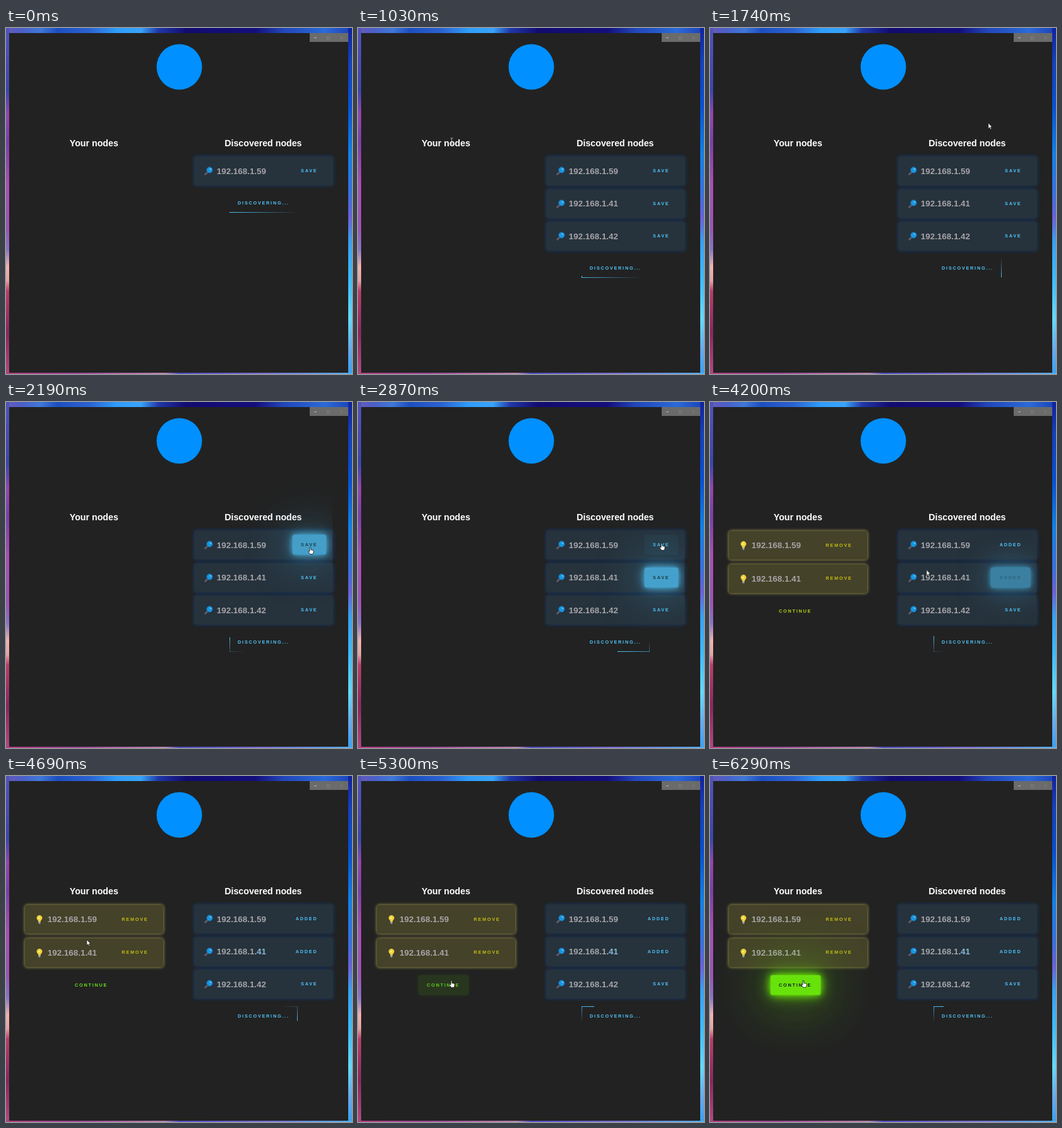
An HTML page that plays this animation: 548x547 px, repeating every 6330 ms.

```html
<!DOCTYPE html>
<html lang="en">
<head>
<meta charset="utf-8">
<title>Node discovery</title>
<style>
  html, body { margin: 0; width: 100%; height: 100%; overflow: hidden; background: #222; }
  #stage { position: absolute; left: 0; top: 0; width: 548px; height: 547px; overflow: hidden;
    font-family: "Liberation Sans", Arial, sans-serif; font-weight: bold; }
  #stage div, #stage svg { position: absolute; }
  .edge-top { inset: 0 0 auto 0; height: 8px; background: linear-gradient(100deg, #6a58b8, #4a60c8 5%,
    #3f78d8 10%, #1d4ec0 15%, #2a62d0 24%, #2f9cfa 32%, #38a4f8 39%, #2038a8 44%, #120c70 52%,
    #140e7c 72%, #2146b8 80%, #2a6ad8 92%, #1c40b8); }
  .edge-left { inset: 0 auto 0 0; width: 5px; background: linear-gradient(#4f56b8, #4a4cae 10%, #3a48a8 18%,
    #9448b0 25%, #7a40a8 33%, #a850b4 45%, #9a54b8 58%, #8a74c4 64%, #f0b4b0 69%, #e6a4a6 73%, #b83e6a 76%,
    #86295e 88%, #b04a80); }
  .edge-right { inset: 0 0 0 auto; width: 6px; background: linear-gradient(#10239a, #1440b8 9%, #0a50d0 22%,
    #1480e4 36%, #3a70dc 48%, #6a62d4 55%, #3aa0f0 62%, #40b8f6 72%, #68d8f6 84%, #6aa8e8 93%, #3aa0f0); }
  .edge-bottom { inset: auto 0 0 0; height: 2px; background: linear-gradient(90deg, #b04080, #a04898 20%,
    #b885ae 46%, #5050c0 50%, #7a70d0 75%, #50b0f0); }
  .window { left: 5px; top: 8px; width: 537px; height: 537px; background: #222; }
  .label { line-height: 0; white-space: nowrap; }
  .title { font-size: 14.2px; color: #fff; }
  .ip { font-size: 13.4px; color: #a5a3a6; }
  .card { border-radius: 4px; }
  .found { left: 298px; width: 220px; height: 46px; background: #26323c; box-shadow: 0 0 5px 1px #18355c; }
  .saved { left: 30px; width: 219px; height: 45px; background: #444229; box-shadow: 0 0 4.5px 1px #8a8345; }
  .layer { inset: 0; }
  #buttons { clip-path: inset(8px 31px 2px 5px); }
  .button { height: 31px; line-height: 31px; padding: 0 13.6px; border-radius: 2.5px; white-space: nowrap;
    font-size: 7.25px; letter-spacing: 1.77px; }
  #discover { left: 353.5px; overflow: hidden; border-radius: 0; color: #4fc3f7; }
</style>
</head>
<body>
<div id="stage">
  <div class="edge-top"></div><div class="edge-left"></div>
  <div class="edge-right"></div><div class="edge-bottom"></div>
  <div class="window"></div>
  <svg width="548" height="547">
    <circle cx="274.5" cy="61.5" r="36" fill="#0090ff"/>
    <rect x="481" y="8" width="61" height="14" fill="#6b6b6b"/>
    <path d="M488 15.5h4" stroke="#bbb" fill="none"/>
    <path d="M508.5 13.5h4v4h-4zM529.5 13.5l4 4m0-4l-4 4" stroke="#858585" stroke-width=".8" fill="none"/>
  </svg>
  <div class="layer" id="cards"></div>
  <div class="layer" id="buttons"></div>
  <svg id="pointer" width="548" height="547">
    <path data-kind="beam" d="M-2-5h1.500l.5.5.5-.5h1.500M0-4.500v9M-2 5h1.500l.5-.5.5.5h1.500" fill="none" stroke="#c8c8c8" stroke-width=".9"/>
    <path data-kind="arrow" d="M-2.500-4.500v9l2-1.900 1.400 3 1.500-.7-1.400-2.900h2.700z" fill="#fff" stroke="#111" stroke-width=".7"/>
    <path data-kind="hand" d="M-2-5.300q1.100-.9 1.900.2v3.600l3.200.6q1.200.3 1.100 1.600l-.5 2.700-.7 1.900h-4.400l-2.700-3.900q-.1-1.400 1.200-1l.9.8z" fill="#fff" stroke="#111" stroke-width=".8"/>
  </svg>
</div>
<script>
const LOOP = 6330, FADE = 500;
const ROW = 51.5, SAVED_ROW = 52.5;
const BLUE = [79, 195, 247], GREEN = [108, 236, 10], YELLOW = [196, 188, 17];
const INK = [16, 28, 34];
const byId = id => document.getElementById(id);

function add(parent, className, html, style) {
  const el = document.createElement('div');
  el.className = className;
  el.innerHTML = html;
  Object.assign(el.style, style);
  return parent.appendChild(el);
}

const px = n => n + 'px';
const at = (x, y) => ({ left: px(x), top: px(y) });
const rgba = (c, a = 1) => `rgba(${c.map(Math.round)},${a})`;
const mix = (a, b, k) => a.map((v, i) => v + (b[i] - v) * k);
const clamp = v => Math.min(1, Math.max(0, v));
const show = (el, on) => { el.style.display = on ? '' : 'none'; };

const lensIcon = `<svg width="16" height="16" viewBox="-8 -8 16 16">
  <path d="M-1.500 1.500L-5.500 5.500" stroke="#625b70" stroke-width="2.600" stroke-linecap="round"/>
  <circle cx="1.500" cy="-1.500" r="4.700" fill="#1c96e0" stroke="#17679f" stroke-width=".9"/>
  <circle cx="3" cy="-3" r="1.100" fill="#8fd8ff"/></svg>`;
const bulbIcon = `<svg width="14" height="16" viewBox="-7 -8 14 16">
  <path d="M-1.800 3.200Q-1.800 1.800-3.200.3A4.300 4.300 0 1 1 3.200.3Q1.800 1.800 1.800 3.200z" fill="#f0d23c"/>
  <circle cx="-.6" cy="-2.500" r="1.500" fill="#fbeb90"/>
  <path d="M-1.700 3.900h3.400M-1.400 5.600h2.800" stroke="#a9a9a4" stroke-width="1.600"/></svg>`;

const cards = byId('cards'), buttons = byId('buttons');
add(cards, 'label title', 'Your nodes', at(100.8, 181.8));
add(cards, 'label title', 'Discovered nodes', at(346.3, 181.8));

// Each switch is [time, hovered].
const found = [
  { ip: '192.168.1.59', from: 0, added: 3100,
    hover: [[1950, 1], [2320, 0], [2840, 1], [3420, 0]] },
  { ip: '192.168.1<span>.41</span>', from: 180, added: 3700,
    hover: [[2340, 1], [2795, 0], [3440, 1], [4070, 0]] },
  { ip: '192.168.1.42', from: 380, added: Infinity, hover: [] }
];
found.forEach((node, i) => {
  const y = i * ROW;
  node.group = add(cards, 'layer', '');
  add(node.group, 'card found', '', { top: px(203 + y) });
  add(node.group, '', lensIcon, at(313, 218 + y));
  node.text = add(node.group, 'label ip', node.ip, at(333.8, 226.8 + y));
  node.button = add(buttons, 'button', 'SAVE', { right: '41px', top: px(210 + y) });
});

const saved = found.slice(0, 2).map((node, i) => {
  const y = i * SAVED_ROW;
  const group = add(cards, 'layer', '');
  add(group, 'card saved', '', { top: px(204 + y) });
  add(group, '', bulbIcon, at(46, 219 + y));
  add(group, 'label ip', node.ip, at(65.8, 227.3 + y));
  add(group, 'button', 'REMOVE', { right: '309px', top: px(210.5 + y), color: rgba(YELLOW) });
  return { group, from: node.added };
});

const proceed = add(buttons, 'button', 'CONTINUE', { left: '95.5px' });
const discover = add(buttons, 'button', 'DISCOVERING...', {});
discover.id = 'discover';
const runners = ['90deg', '180deg', '270deg', '0deg'].map((angle, i) => add(discover, '', '', {
  background: `linear-gradient(${angle}, transparent, ${rgba(BLUE)})`,
  width: i % 2 ? '1px' : '100%', height: i % 2 ? '100%' : '1px'
}));
const runnerSides = ['left', 'top', 'right', 'bottom'];
const fixedSides = ['top', 'right', 'bottom', 'left'];
runners.forEach((el, i) => { el.style[fixedSides[i]] = 0; });

// cubic-bezier(.25, .1, .25, 1)
function ease(x) {
  let lo = 0, hi = 1;
  for (let i = 0; i < 16; i++) {
    const s = (lo + hi) / 2, r = 1 - s;
    if (.75 * s * r * r + .75 * s * s * r + s * s * s < x) lo = s; else hi = s;
  }
  const r = 1 - lo;
  return .3 * lo * r * r + 3 * lo * lo * r + lo * lo * lo;
}

function hoverLevel(switches, t) {
  let level = 0;
  switches.forEach(([start, goal], i) => {
    if (t < start) return;
    const end = Math.min(t, i + 1 < switches.length ? switches[i + 1][0] : t);
    level += (goal - level) * ease(clamp((end - start) / FADE));
  });
  return level;
}

function paintButton(el, color, level, idle = color) {
  el.style.color = rgba(mix(idle, INK, level));
  el.style.background = rgba(color, level * .95);
  el.style.boxShadow = level < .002 ? 'none' : [2.3, 11.3, 22.6, 90.6]
    .map(blur => `0 0 ${blur * level}px ${rgba(color, level * .9)}`).join();
}

// Pointer path: time, x, y, shape.
const path = [
  [880, 135, 205, 'arrow'], [1030, 148, 179, 'beam'], [1110, 172, 176, 'arrow'],
  [1310, 296, 163, 'arrow'], [1580, 395, 112, 'arrow'], [1780, 455, 165, 'arrow'],
  [1940, 482, 231, 'hand'], [2190, 483, 235, 'hand'], [2340, 483, 264, 'hand'],
  [2500, 483, 279, 'hand'], [2700, 482, 272, 'hand'], [2850, 482, 229, 'hand'],
  [3300, 482, 230, 'hand'], [3480, 480, 274, 'hand'], [3950, 477, 275, 'hand'],
  [4065, 440, 268, 'arrow'], [4200, 346, 270, 'arrow'], [4530, 148, 226, 'arrow'],
  [4850, 113, 300, 'arrow'], [5210, 149, 329, 'hand'], [LOOP, 149, 329, 'hand']
];
const pointer = byId('pointer');

function paintPointer(t) {
  show(pointer, t >= path[0][0]);
  if (t < path[0][0]) return;
  const i = path.findIndex(p => p[0] > t);
  const [t0, x0, y0, kind] = path[i - 1], [t1, x1, y1] = path[i];
  const k = (t - t0) / (t1 - t0);
  for (const shape of pointer.children) {
    show(shape, shape.dataset.kind === kind);
    shape.setAttribute('transform', `translate(${x0 + (x1 - x0) * k} ${y0 + (y1 - y0) * k})`);
  }
}

function paint(t) {
  let rows = 0;
  for (const node of found) {
    const visible = t >= node.from;
    rows += visible;
    show(node.group, visible);
    show(node.button, visible);
    node.button.textContent = t >= node.added ? 'ADDED' : 'SAVE';
    paintButton(node.button, BLUE, hoverLevel(node.hover, t));
  }
  found[1].text.firstElementChild.style.color = t > 4300 ? '#83b9d2' : '';

  const count = saved.filter(s => t >= s.from).length;
  saved.forEach(s => show(s.group, t >= s.from));
  show(proceed, count > 0);
  proceed.style.top = px(314.5 - (2 - count) * SAVED_ROW);
  paintButton(proceed, GREEN, hoverLevel([[5250, 1]], t), t < 4590 ? [178, 208, 24] : [104, 226, 26]);

  discover.style.top = px(261 + (rows - 1) * ROW);
  runners.forEach((el, i) => {
    const phase = (t / 1000 + .747 - i / 4 + 1) % 1;
    el.style[runnerSides[i]] = Math.min(100, phase * 400 - 100) + '%';
  });
  paintPointer(t);
}

const start = performance.now();
function tick() {
  paint((performance.now() - start) % LOOP);
  requestAnimationFrame(tick);
}
tick();
</script>
</body>
</html>
```
